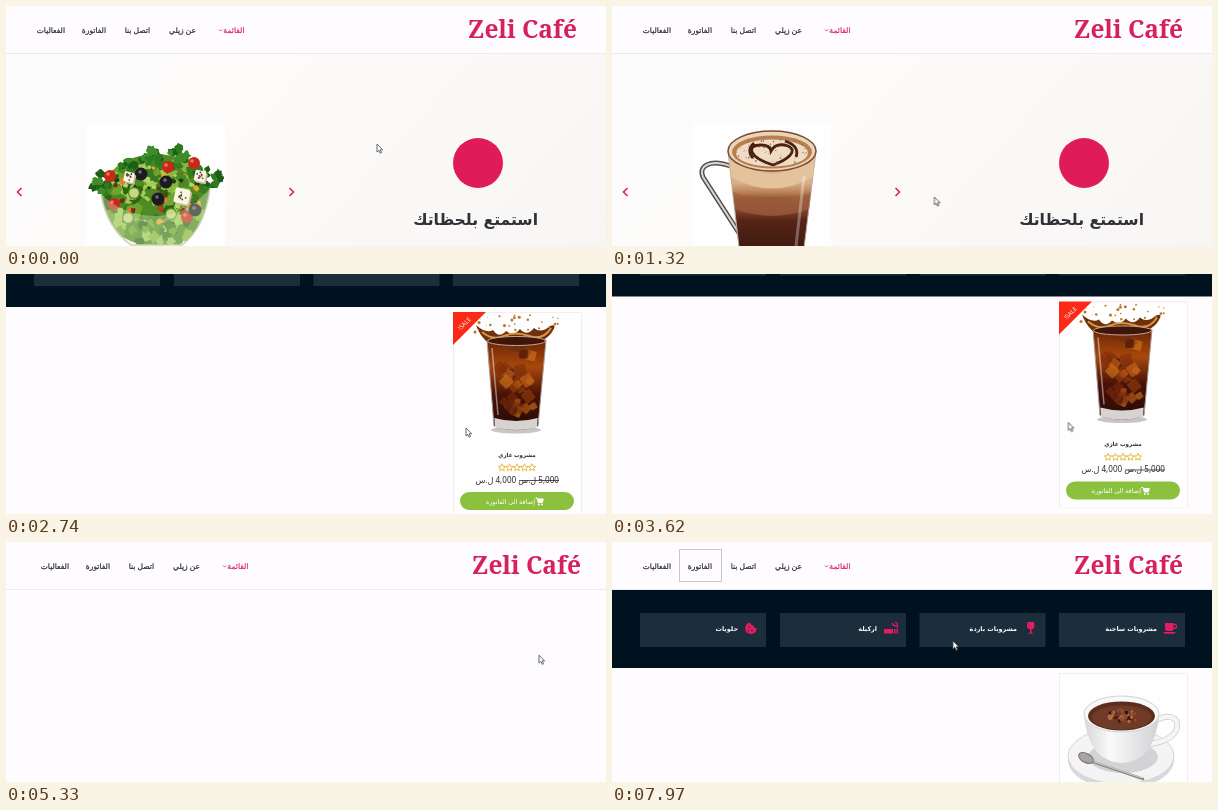
Recreate the animation shown at these times as an HTML page. Size 600 px wide and 240 px high, loop 8 s.

```html
<!DOCTYPE html>
<html lang="ar">
<head>
<meta charset="utf-8">
<title>Zeli Café</title>
<style>
  html, body { margin: 0; width: 100%; height: 100%; overflow: hidden; background: #fefcff; }
  svg { display: block; width: 100vw; height: 100vh; }
  text { font-family: "Noto Sans", "DejaVu Sans", sans-serif; direction: rtl; fill: #2a2a2e; }
  .brand { font: bold 24.5px "Noto Serif", serif; direction: ltr; text-anchor: end; fill: #d6215f; }
  .nav { font-size: 7.6px; stroke: #2a2a2e; stroke-width: .2; }
  .active { fill: #d6215f; stroke: #d6215f; }
  .label { font-family: "DejaVu Sans", sans-serif; font-weight: bold; font-size: 6.4px; fill: #fff; }
  .slogan { font-family: "DejaVu Sans", sans-serif; font-weight: bold; font-size: 15.6px; fill: #303036; }
  .mid { text-anchor: middle; }
  .name { font-weight: bold; font-size: 5.6px; }
  .price { font-size: 8.1px; }
  .buy { font-size: 6.5px; fill: #fff; }
  .sale { font-size: 6px; fill: #fff; direction: ltr; text-anchor: middle; }

  .anim { animation-duration: 8s; animation-iteration-count: infinite; animation-timing-function: linear; }
  .step { animation-timing-function: step-end; }
  #page { animation-name: scroll; }
  #menu { animation-name: shift; }
  #hero { animation-name: hero; }
  #band { animation-name: band; }
  #cola { animation-name: cola; }
  #mocha { animation-name: mocha; }
  #focus { animation-name: focus; }
  #salad { animation-name: slideOut; }
  #latte { animation-name: slideIn; }
  #cursor { animation-name: cursor; }

  @keyframes scroll {
    0%, 30.6% { transform: translateY(0); animation-timing-function: ease-in-out; }
    33.5%, 36.9% { transform: translateY(-93px); animation-timing-function: ease-in-out; }
    39.4%, 43% { transform: translateY(-140px); animation-timing-function: ease-in-out; }
    49.4%, 70% { transform: translateY(0); animation-timing-function: ease-in-out; }
    76.1%, 79% { transform: translateY(-94px); }
    80.5% { transform: translateY(-51px); }
    82.2%, 100% { transform: translateY(0); }
  }
  @keyframes shift {
    0% { transform: none; }
    24.38% { transform: translateX(4px); }
    28.25% { transform: none; }
    63.13% { transform: translateX(4px); }
    67.2%, 100% { transform: none; }
  }
  @keyframes hero { 0% { visibility: visible; } 24.38%, 100% { visibility: hidden; } }
  @keyframes band {
    0% { visibility: hidden; }
    28.25% { visibility: visible; }
    63.13% { visibility: hidden; }
    67.2%, 100% { visibility: visible; }
  }
  @keyframes cola {
    0% { visibility: hidden; }
    28.25% { visibility: visible; }
    63.13%, 100% { visibility: hidden; }
  }
  @keyframes mocha { 0% { visibility: hidden; } 67.2%, 100% { visibility: visible; } }
  @keyframes focus { 0% { visibility: hidden; } 86.5%, 100% { visibility: visible; } }
  @keyframes slideOut {
    0%, 3% { transform: none; animation-timing-function: ease; }
    10%, 100% { transform: translateX(296px); }
  }
  @keyframes slideIn {
    0%, 3% { transform: translateX(-296px); animation-timing-function: ease; }
    10%, 100% { transform: none; }
  }
  @keyframes cursor {
    0% { transform: translate(370px, 138px); }
    16.5% { transform: translate(321px, 191px); }
    22.1%, 28.25% { transform: translate(470px, 162px); }
    32%, 35% { transform: translate(459px, 154px); }
    46% { transform: translate(455px, 148px); }
    52.75% { transform: translate(408px, 99px); }
    59.3%, 63.1% { transform: translate(541px, 107px); }
    66.6% { transform: translate(533px, 113px); }
    75%, 80.5% { transform: translate(297px, 145px); }
    85.5%, 86.5% { transform: translate(88px, 24px); }
    89.5% { transform: translate(292px, 88px); }
    92.1%, 100% { transform: translate(340px, 99px); }
  }
</style>
</head>
<body>
<svg viewBox="0 0 600 240" preserveAspectRatio="none">
  <defs>
    <linearGradient id="wash" x1="0" y1="0" x2="1" y2=".6">
      <stop offset="0" stop-color="#fdfcfc"/><stop offset=".4" stop-color="#fcfbfa"/><stop offset="1" stop-color="#f8f6f5"/>
    </linearGradient>
    <linearGradient id="brew" x1="0" y1="0" x2="0" y2="1">
      <stop offset=".3" stop-color="#d9b08a"/><stop offset=".4" stop-color="#b87f55"/>
      <stop offset=".46" stop-color="#8f5033"/><stop offset=".58" stop-color="#7b3f28"/>
      <stop offset=".66" stop-color="#552416"/><stop offset="1" stop-color="#3d180f"/>
    </linearGradient>
    <linearGradient id="soda" x1="0" y1="0" x2="0" y2="1">
      <stop offset="0" stop-color="#6b2408"/><stop offset=".3" stop-color="#a8480c"/>
      <stop offset=".6" stop-color="#4a1207"/><stop offset="1" stop-color="#240a06"/>
    </linearGradient>
    <linearGradient id="china" x1="0" y1="0" x2="1" y2="0">
      <stop offset="0" stop-color="#d6d6d8"/><stop offset=".35" stop-color="#fafafa"/><stop offset="1" stop-color="#d2d2d5"/>
    </linearGradient>
    <clipPath id="slider"><rect x="2" y="60" width="296" height="340"/></clipPath>
    <clipPath id="bowl"><path d="M78 120H222V182H204Q199 222 176 239H125Q101 222 95 188H78Z"/></clipPath>
    <path id="star" d="M0-3.7 1.1-1.2 3.7-1 1.7.7 2.3 3.2 0 1.9-2.3 3.2-1.7.7-3.7-1-1.1-1.2Z" fill="none" stroke="#e6b530" stroke-width=".9"/>
    <g id="stars">
      <use href="#star" x="496"/><use href="#star" x="503.5"/><use href="#star" x="511"/><use href="#star" x="518.5"/><use href="#star" x="526"/>
    </g>
    <g id="button">
      <rect x="454" y="311" width="114" height="18" rx="9" fill="#8cc03f"/>
      <text class="buy" x="529" y="322.5">إضافة الى الفاتورة</text>
      <path d="M529.500 317h1.500l1.300 4.500h4l1-3.500h-5.500" fill="#fff" stroke="#fff"/>
      <circle cx="532.800" cy="323.500" r=".9" fill="#fff"/><circle cx="536" cy="323.500" r=".9" fill="#fff"/>
    </g>
    <rect id="frame" x="447.500" y="131.500" width="128" height="206" fill="#fffeff" stroke="#f0eeef"/>
  </defs>

  <rect width="600" height="240" fill="#fefcff"/>
  <g id="page" class="anim">
    <g id="hero" class="anim step">
      <rect width="600" height="400" fill="url(#wash)"/>
      <g clip-path="url(#slider)">
        <g id="salad" class="anim">
          <rect x="80" y="117" width="139" height="139" fill="#fefefe"/>
          <g id="greens" clip-path="url(#bowl)"></g>
          <path d="M95 188Q101 222 125 239H176Q199 222 204 182Q180 211 148 210T95 188" fill="#e6efd0" opacity=".35"/>
          <path d="M95 188Q101 222 125 239H176Q199 222 204 182" fill="none" stroke="#c9d3b4" stroke-width="1.500"/>
        </g>
        <g id="latte" class="anim">
          <rect x="80" y="117" width="139" height="139" fill="#fefefe"/>
          <path d="M118 160C98 153 86 160 91 171L127 227" fill="none" stroke="#55504d" stroke-width="5"/>
          <path d="M118 160C98 153 86 160 91 171L127 227" fill="none" stroke="#d9d5d2" stroke-width="2"/>
          <path d="M116 145 128 250H191L204 145Z" fill="url(#brew)" stroke="#b8a79c"/>
          <path d="M117 149Q160 186 203 149L201 171Q160 194 119 171Z" fill="#e3c29c"/>
          <path d="M121 186Q160 200 199 186L197 203Q160 217 123 203Z" fill="#a4623f" opacity=".65"/>
          <path d="M192 170 184 240" stroke="#fff" stroke-width="3" opacity=".3"/>
          <ellipse cx="160" cy="145" rx="44" ry="20" fill="#e9d4bc" stroke="#7d4a2d" stroke-width="1.500"/>
          <ellipse cx="160" cy="146" rx="40" ry="16.500" fill="#b77f50"/>
          <ellipse cx="160" cy="147" rx="36" ry="13.500" fill="#f0dcc2"/>
          <path d="M161 159C136 151 134 139 149 139Q158 139 159 145Q164 136 176 140C187 145 175 154 161 159M142 137Q134 144 141 152M173 135Q188 140 184 151" fill="none" stroke="#4a2015" stroke-width="2.800"/>
          <g id="cocoa" fill="#7d4a2d"></g>
        </g>
      </g>
      <path d="M15.500 182 11.500 186l4 4M283.500 182l4 4-4 4" fill="none" stroke="#d6215f" stroke-width="1.600"/>
      <circle cx="472" cy="157" r="25" fill="#df1b5c"/>
      <text class="slogan" x="532" y="219">استمتع بلحظاتك</text>
    </g>

    <rect width="600" height="47" fill="#fefcff"/>
    <rect y="47" width="600" height="1" fill="#ecebec"/>
    <g id="menu" class="anim step">
      <text class="brand" x="571" y="32">Zeli Café</text>
      <text class="nav" x="59" y="26.500">الفعاليات</text>
      <text class="nav" x="100" y="26.500">الفاتورة</text>
      <text class="nav" x="144" y="26.500">اتصل بنا</text>
      <text class="nav" x="190" y="26.500">عن زيلي</text>
      <text class="nav active" x="238.500" y="26.500">القائمة</text>
      <path d="M213 23.500l1.600 1.600 1.600-1.600" fill="none" stroke="#d6215f" stroke-width=".8"/>
    </g>
    <rect id="focus" class="anim step" x="67.500" y="7.500" width="42" height="32" fill="none" stroke="#777" stroke-width=".8" stroke-dasharray="1 1"/>

    <g id="band" class="anim step">
      <rect y="48" width="600" height="78" fill="#001220"/>
      <path d="M28 71h126v34H28zM168 71h126v34H168zM307.500 71h126v34h-126zM447 71h126v34H447z" fill="#1c2d3c"/>
      <text class="label" x="545" y="89">مشروبات ساخنة</text>
      <text class="label" x="405" y="89">مشروبات باردة</text>
      <text class="label" x="265" y="89">اركيلة</text>
      <text class="label" x="126" y="89">حلويات</text>
      <g fill="#e31c63">
        <path d="M553 81h8.500v6q0 2-2 2h-4.500q-2 0-2-2zM551 90h13q-1 1.700-2.500 1.700h-8q-2 0-2.500-1.700z"/>
        <path d="M561 82.300h1.500q2 0 2 2t-2 2H561" fill="none" stroke="#e31c63" stroke-width="1.300"/>
        <path d="M415.500 80h6.500l.5 4q0 3-3 3.300v3.200l2.500 1.300h-6.500l2.500-1.300v-3.200q-3-.3-3-3.300z"/>
        <path d="M272 87h9v4.500h-9zM282 87h1.500v4.500H282zM284.500 87h1.500v4.500h-1.500z"/>
        <path d="M280.500 81q0 2.700 2.500 2.700t2.300 2.500M283 80.500q2.500 0 2.500 3" fill="none" stroke="#e31c63" stroke-width="1.200"/>
        <path d="M138 80.500q1 3 3.500 3 0 2.500 3.300 2.700-.5 5.500-5.800 5.700-5.500 0-5.800-5.600 0-4.800 4.800-5.800z"/>
      </g>
      <g fill="#1c2d3c"><circle cx="137" cy="85" r=".8"/><circle cx="140" cy="88.500" r=".8"/><circle cx="136.500" cy="88.700" r=".7"/></g>
    </g>

    <g id="cola" class="anim step">
      <use href="#frame"/>
      <ellipse cx="510" cy="249" rx="25" ry="3.500" fill="#c9c5c4"/>
      <path d="M481 159 488 245Q510 253 532 245L540 159Z" fill="url(#soda)" stroke="#a59a96"/>
      <path d="M488.300 237 489 246Q510 252 531 246L531.700 237Q510 243 488.300 237Z" fill="#d8d2d0"/>
      <g id="ice"></g>
      <path d="M486 167 492 234" stroke="#fff" stroke-width="1.500" opacity=".45"/>
      <path d="M480 160Q473 153 470 144 480 153 487 149 493 158 500 150 508 156 514 148 521 156 528 147 535 153 544 145 552 142 546 151 541 160 511 171 480 160Z" fill="#70300e"/>
      <path d="M476 151Q487 160 498 155T523 155T545 147" fill="none" stroke="#d79a3e" stroke-width="2"/>
      <ellipse cx="510.500" cy="160" rx="29" ry="4.500" fill="#401407" stroke="#c3a793"/>
      <g id="drops" fill="#b87a25"></g>
      <path d="M447 131h33l-33 33z" fill="#fb2a17"/>
      <text class="sale" transform="translate(460 144) rotate(-45)">!SALE</text>
      <text class="name mid" x="511" y="276">مشروب غازي</text>
      <use href="#stars" y="286.500"/>
      <text class="price" x="553" y="302">5,000 ل.س 4,000 ل.س</text>
      <path d="M513 299.500h40" stroke="#2a2a2e" stroke-width=".8"/>
      <use href="#button"/>
    </g>

    <g id="mocha" class="anim step">
      <use href="#frame"/>
      <ellipse cx="509" cy="218" rx="53" ry="29" fill="#d9d9dc"/>
      <ellipse cx="509" cy="214" rx="53" ry="28" fill="#f4f4f5" stroke="#d5d5d8"/>
      <ellipse cx="511" cy="215" rx="35" ry="16" fill="#d3d3d6"/>
      <path d="M543 179C556 171 567 175 565 185 563 196 551 200 538 202" fill="none" stroke="#c9c9cd" stroke-width="6"/>
      <path d="M543 179C556 171 567 175 565 185 563 196 551 200 538 202" fill="none" stroke="#f5f5f6" stroke-width="4.500"/>
      <path d="M472 172C474 198 484 220 510 221 535 220 545 198 547 172Z" fill="url(#china)"/>
      <ellipse cx="509.500" cy="172" rx="37.500" ry="18" fill="#f8f8f8" stroke="#d2d2d4"/>
      <ellipse cx="509.500" cy="174" rx="33.500" ry="14.500" fill="#5b2d1e"/>
      <ellipse cx="509.500" cy="175.500" rx="30" ry="12" fill="#6f3b28"/>
      <g id="shavings"></g>
      <path d="M478 219 531 237" stroke="#8d8987" stroke-width="2.500" stroke-linecap="round"/>
      <path d="M478 218.500 530 236" stroke="#d2cecb" stroke-linecap="round"/>
      <ellipse cx="474" cy="216" rx="8" ry="4.500" transform="rotate(28 474 216)" fill="#a9a4a1" stroke="#77716e"/>
      <text class="name mid" x="511" y="276">قهوة</text>
      <use href="#stars" y="287"/>
      <text class="price mid" x="511" y="302">3,000 ل.س</text>
      <use href="#button"/>
    </g>
  </g>

  <path id="cursor" class="anim" d="M1 0V8L2.900 6.300 4.200 9.200 5.500 8.600 4.200 5.800H6.700Z" fill="#fff" stroke="#444" stroke-width=".8"/>
</svg>
<script>
  let seed = 11;
  const rnd = (lo = 0, hi = 1) => {
    seed = (seed * 16807) % 2147483647;
    return lo + (hi - lo) * seed / 2147483647;
  };
  const pick = list => list[Math.floor(rnd(0, list.length))];
  const add = (id, tag, attrs) => {
    const el = document.createElementNS('http://www.w3.org/2000/svg', tag);
    for (const key in attrs) el.setAttribute(key, attrs[key]);
    document.getElementById(id).append(el);
  };
  // Random point in an ellipse
  const spot = (cx, cy, rx, ry) => {
    const a = rnd(0, 2 * Math.PI), r = Math.sqrt(rnd());
    return [cx + rx * r * Math.cos(a), cy + ry * r * Math.sin(a)];
  };
  const dot = (id, [cx, cy], r, fill) => add(id, 'circle', { cx, cy, r, ...(fill && { fill }) });
  const leaf = ([x, y], size, fill) => {
    const points = Array.from({ length: 14 }, (_, i) => {
      const a = i / 14 * 2 * Math.PI, r = size * rnd(.55, 1.1);
      return `${x + r * Math.cos(a)},${y + r * Math.sin(a)}`;
    });
    add('greens', 'polygon', { points: points.join(' '), fill });
  };
  const block = (id, [x, y], size, angle, fill, opacity = 1) =>
    add(id, 'rect', { x: -size / 2, y: -size / 2, width: size, height: size, rx: size / 8,
      transform: `translate(${x} ${y}) rotate(${angle})`, fill, opacity });

  const light = ['#6da52c', '#85b83c', '#4b8a22', '#a3cb58', '#2f6415', '#3b7a1e'];
  const dark = ['#1f5d17', '#2d7a1f', '#3d8d28'];
  const bits = ['#c9341b', '#e2a92b', '#1f3d12', '#b5d56a', '#7a2a16', '#e07a2c'];
  add('greens', 'ellipse', { cx: 150, cy: 194, rx: 56, ry: 46, fill: '#4f8a24' });
  for (let i = 0; i < 130; i++) leaf(spot(150, 194, 54, 44), rnd(4, 9), pick(light));
  for (const [x, y, r] of [[97, 177, 14], [204, 170, 14], [145, 151, 11], [172, 148, 10], [122, 160, 7]])
    for (let i = 0; i < 16; i++) leaf(spot(x, y, r, r * .8), rnd(3, 5.5), pick(dark));
  for (let i = 0; i < 45; i++) leaf(spot(150, 188, 46, 28), rnd(1.5, 4), pick(bits));
  for (const p of [[104, 170], [108, 198], [162, 161], [181, 211], [188, 157]]) {
    dot('greens', p, 6, '#c92818');
    dot('greens', [p[0] - 2, p[1] - 2], 1.8, '#f0785a');
  }
  for (const p of [[128, 187], [165, 208], [122, 212]]) {
    dot('greens', p, 6, '#4c8c25');
    dot('greens', p, 4.8, '#c4d980');
  }
  for (const p of [[135, 168], [160, 176], [189, 204], [152, 193]]) {
    dot('greens', p, 6.5, '#1d1a22');
    dot('greens', [p[0] - 1, p[1] - 2], 1.8, '#716a77');
  }
  for (const [x, y, s] of [[176, 190, 15], [194, 170, 11], [123, 171, 10]]) {
    block('greens', [x + 1.5, y + 2], s, 12, '#c9bd9a');
    block('greens', [x, y], s, 12, '#fbf5e4');
    for (let i = 0; i < 9; i++) dot('greens', spot(x, y, s * .4, s * .4), .9, '#5b4a30');
  }

  for (let i = 0; i < 60; i++) dot('cocoa', spot(160, 146, 36, 14), rnd(.3, .8));
  for (let i = 0; i < 26; i++)
    block('ice', [rnd(492, 529), rnd(170, 231)], rnd(6, 13), rnd(0, 90), pick(['#d5781b', '#98400d', '#c9671a', '#3c1007', '#7b2b0a']), .6);
  for (let i = 0; i < 28; i++) dot('drops', [rnd(468, 554), rnd(134, 153)], rnd(.4, 1.6));
  for (let i = 0; i < 45; i++)
    block('shavings', spot(511, 174, 15, 6.5), rnd(1.5, 4), rnd(0, 90), pick(['#2e120b', '#8f4d2e', '#b56b43', '#4a1f13']));
</script>
</body>
</html>
```
